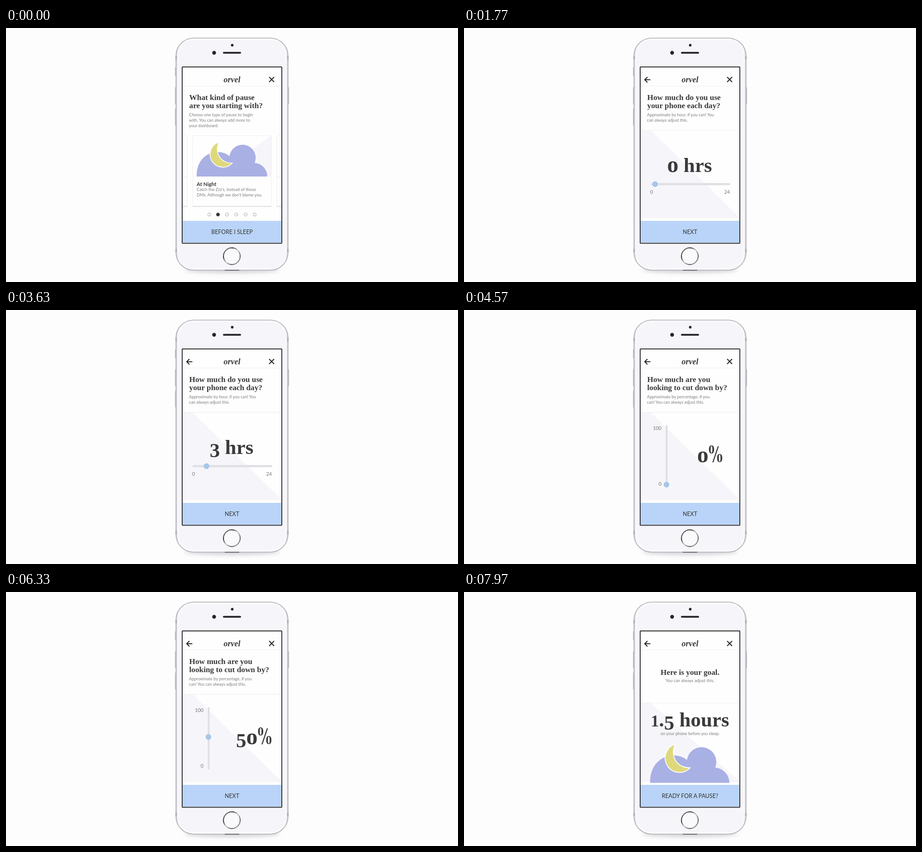
Animation of 998x561 px, one loop 8000 ms. Source, as an HTML page:

```html
<!DOCTYPE html>
<html lang="en">
<head>
<meta charset="utf-8">
<title>Phone habit setup</title>
<style>
  html, body { margin: 0; width: 100%; height: 100%; overflow: hidden; background: #fdfdfd; }
  svg { display: block; width: 100vw; height: 100vh; }
  text { font-family: Lato, sans-serif; fill: #3a3a3a; white-space: pre; }
  .serif, .serif tspan { font-family: "Liberation Serif", serif; font-weight: 700; }
  .title { font-size: 17.3px; }
  .big { font-size: 45px; text-anchor: middle; }
  .small { font-size: 9.25px; fill: #7d7d7d; }
  .tick { font-size: 10.8px; fill: #777; }
  .action { font-size: 12.4px; text-anchor: middle; fill: #333; }
  .mid { text-anchor: middle; }
  .end { text-anchor: end; }
  .hair { stroke: #ededed; fill: none; }
  .shade { fill: #f6f6fa; }
  .track { fill: #dfdfe4; }
  .thumb { fill: #a6c6ea; }
  .icon { fill: none; stroke: #222; stroke-width: 2; }
</style>
</head>
<body>
<svg viewBox="0 0 998 561">
  <defs>
    <linearGradient id="ring" x2="1" y2="1">
      <stop offset="0" stop-color="#aaa"/>
      <stop offset=".28" stop-color="#222"/>
      <stop offset=".5" stop-color="#c8c8c8"/>
      <stop offset=".75" stop-color="#555"/>
      <stop offset="1" stop-color="#ddd"/>
    </linearGradient>
    <linearGradient id="rim">
      <stop offset="0" stop-color="#cfcfd6"/>
      <stop offset=".03" stop-color="#f0f0f4"/>
      <stop offset=".97" stop-color="#f0f0f4"/>
      <stop offset="1" stop-color="#cfcfd6"/>
    </linearGradient>
    <filter id="blur" x="-20%" y="-200%" width="140%" height="500%">
      <feGaussianBlur stdDeviation="4"/>
    </filter>
    <clipPath id="glass"><path d="M390 87h218v387H390z"/></clipPath>
    <g id="nightCloud">
      <path fill="#a9b0e4" d="M421 328C420 296 440 274 468 274Q483 274 493.5 283A29 29 0 1 1 549 298A30 30 0 0 1 577 328Z"/>
      <path fill="#dfd87b" stroke="#fff" stroke-width="1.6" stroke-linejoin="round"
        d="M471 252A28.3 28.3 0 1 0 500 298A30.3 30.3 0 0 1 471 252Z"/>
    </g>
  </defs>

  <rect width="998" height="561" fill="#fdfdfd"/>

  <!-- Phone -->
  <ellipse cx="499" cy="534" rx="105" ry="7" fill="#b8b8c0" opacity=".6" filter="url(#blur)"/>
  <path stroke="#c4c4ca" stroke-width="2" d="M374 87v19M374 131v37M374 178v37M624 131v37"/>
  <rect x="375.2" y="22.2" width="247.6" height="512.6" rx="39" fill="url(#rim)" stroke="#b0b0b6" stroke-width="1.6"/>
  <rect x="379" y="25" width="240" height="507" rx="36" fill="#f6f6fa" stroke="#fff" stroke-width="1.5"/>
  <path stroke="#a2a2a8" stroke-width="2.5" d="M375.5 62v7M622.5 62v7M375.5 488v7M622.5 488v7"/>
  <path stroke="#55555c" stroke-width="1.6" d="M483 535h32"/>
  <g fill="#25262c">
    <circle cx="499.5" cy="38" r="2.9"/>
    <circle cx="459.5" cy="54.7" r="4.2"/>
    <rect x="479" y="52.7" width="40" height="4" rx="2"/>
  </g>
  <circle cx="498.6" cy="504" r="18.5" fill="#fafafc" stroke="url(#ring)" stroke-width="2"/>

  <!-- App -->
  <rect x="389" y="86" width="220" height="389.5" rx="1" fill="#fefefe" stroke="#2e2e30" stroke-width="2"/>
  <g id="screens" clip-path="url(#glass)"></g>
  <path class="hair" d="M390 128h218"/>
  <text class="serif mid" x="499" y="119.5" font-size="18" font-style="italic">orvel</text>
  <path class="icon" d="M581 108.3l11 11M592 108.3l-11 11"/>
</svg>
<script>
const LOOP = 8000;
const CHANGES = [800, 3950, 7080];   // when each following screen starts to appear
const FADE = 200, PRESS = 250;
const SLIDE_DELAY = 700, SLIDE = 850;

const text = (cls, x, y, str) => `<text class="${cls}" x="${x}" y="${y}">${str}</text>`;
const lines = (cls, x, y, step, rows) => rows.map((row, i) => text(cls, x, y + i * step, row)).join('');
const heading = (title, note) =>
  lines('serif title', 404.5, 159, 18, title) + lines('small', 404, 194.5, 12, note);
const panel = top => `<path class="shade" d="M390 ${top}h22L608 418v2H390z"/><path class="hair" d="M390 ${top}h218"/>`;
const arrow = '<path class="icon" d="M411.5 114.3h-12.5M405 108.3l-6 6 6 6"/>';

// Text with old-style figures: low 0 1 2, descending 3 4 5 7 9, and a slim percent sign.
function figures(str) {
  let shift = 0;
  const span = (ch, size, drop = 0, extra = '') => {
    const part = `<tspan font-size="${size}" dy="${drop - shift}" ${extra}>${ch}</tspan>`;
    shift = drop;
    return part;
  };
  return [...str].map(ch => {
    if (ch === '0') return span('o', 50);
    if ('12'.includes(ch)) return span(ch, 36);
    if ('34579'.includes(ch)) return span(ch, 45, 7);
    if (ch === '%') {
      return span('0', 27, -19) + span('/', 52, 0, 'dx="-5" style="font-weight:400"') + span('0', 27, 0, 'dx="-5"');
    }
    return span(ch, 45);
  }).join('');
}

const card = `
  <path class="shade" d="M586 238v90H450z"/>
  <path class="hair" d="M412 238h174v156H412zM390 238h10v156h-10M608 238h-10v156h10M390 328h10M598 328h10"/>
  <path stroke="#d8d8dc" stroke-width="1.4" d="M412 394.3h174M390 394.3h10M598 394.3h10"/>
  <use href="#nightCloud"/>
  <text x="421" y="349" font-size="11.6" font-weight="700">At Night</text>` +
  lines('small', 421, 360, 11.5, ["Catch the Zzz's, instead of those", "DMs. Although we don't blame you."]);

const dots = [449, 468, 488, 508.5, 529, 549].map((x, i) =>
  `<circle cx="${x}" cy="412" r="3.5" stroke="${i === 1 ? '#333' : '#999'}" stroke-width=".9" fill="${i === 1 ? '#333' : '#fff'}"/>`).join('');

const screens = [
  { action: 'BEFORE I SLEEP',
    body: heading(['What kind of pause', 'are you starting with?'],
      ['Choose one type of pause to begin', 'with. You can always add more to', 'your dashboard.']) + card + dots },
  { action: 'NEXT',
    body: arrow + panel(226) +
      heading(['How much do you use', 'your phone each day?'],
        ['Approximate by hour, if you can! You', 'can always adjust this.']) +
      '<text id="hours" class="serif big" x="498" y="318"></text>' +
      '<rect class="track" x="412" y="342.6" width="176" height="4.6" rx="2"/>' +
      '<circle id="hourThumb" class="thumb" cy="344.9" r="6.3"/>' +
      text('tick', 411, 366, '0') + text('tick end', 587, 366, '24') },
  { action: 'NEXT',
    body: arrow + panel(226) +
      heading(['How much are you', 'looking to cut down by?'],
        ['Approximate by percentage, if you', 'can! You can always adjust this.']) +
      '<text id="percent" class="serif big" y="336"></text>' +
      '<rect class="track" x="445.4" y="254" width="4" height="138" rx="2"/>' +
      '<circle id="percentThumb" class="thumb" cx="447" r="6.3"/>' +
      text('tick end', 436, 265, '100') + text('tick end', 436, 388, '0') },
  { action: 'READY FOR A PAUSE?',
    body: arrow + panel(245) +
      text('serif title mid', 499, 183, 'Here is your goal.') +
      text('small mid', 499, 199, 'You can always adjust this.') +
      text('serif big', 499, 297, figures('1.5 hours')) +
      text('small mid', 499, 316, 'on your phone before you sleep.') +
      '<use href="#nightCloud" transform="translate(-61.4 53.5) scale(1.122)"/>' }
];

const $ = id => document.getElementById(id);
$('screens').innerHTML = screens.map(({ action, body }) => `
  <g class="screen">
    <rect x="390" y="87" width="218" height="387" fill="#fefefe"/>${body}
    <rect x="390" y="426" width="218" height="49" fill="#b9d4f8"/>
    <g class="label">${text('action', 499, 455, action)}</g>
  </g>`).join('');
const groups = [...document.querySelectorAll('.screen')];
const labels = [...document.querySelectorAll('.label')];

const clamp = v => Math.min(1, Math.max(0, v));
const ease = v => v * v * (3 - 2 * v);
const progress = (t, start, length) => ease(clamp((t - start) / length));

function draw(t) {
  groups.forEach((group, i) => {
    const shown = i ? progress(t, CHANGES[i - 1], FADE) : 1;
    const covered = i < CHANGES.length && t >= CHANGES[i] + FADE;
    group.setAttribute('opacity', shown);
    group.setAttribute('display', shown && !covered ? 'inline' : 'none');

    const press = i < CHANGES.length ? Math.sin(Math.PI * clamp((t - CHANGES[i]) / PRESS + 1)) : 0;
    labels[i].setAttribute('transform', `translate(499 450.5) scale(${1 - 0.04 * press}) translate(-499 -450.5)`);
  });

  const hours = 3.8 * progress(t, CHANGES[0] + SLIDE_DELAY, SLIDE);
  $('hourThumb').setAttribute('cx', 415.3 + 7.2 * hours);
  $('hours').innerHTML = figures(`${Math.floor(hours)} hrs`);

  const percent = 50 * progress(t, CHANGES[1] + SLIDE_DELAY, SLIDE);
  const label = String(Math.round(percent));
  $('percentThumb').setAttribute('cy', 385.6 - 1.31 * percent);
  $('percent').setAttribute('x', label.length > 1 ? 547.5 : 543);
  $('percent').innerHTML = figures(label + '%');
}

const start = performance.now();
function frame() {
  draw((performance.now() - start) % LOOP);
  requestAnimationFrame(frame);
}
frame();
</script>
</body>
</html>
```
